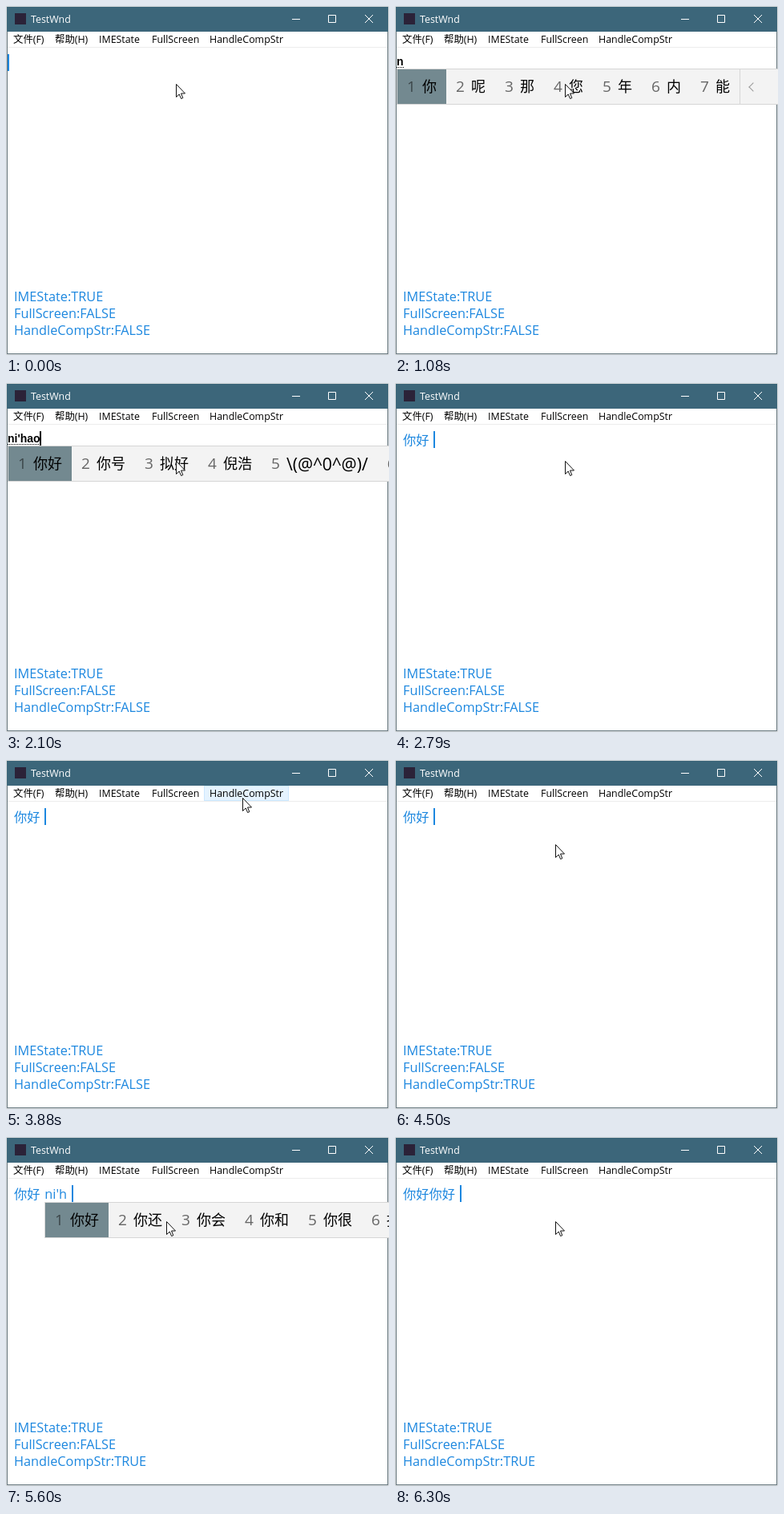
An HTML page for the animation above (8.63 s loop, 478x435 px).

```html
<!DOCTYPE html>
<html lang="zh-CN">
<head>
<meta charset="utf-8">
<title>TestWnd</title>
<style>
html, body { margin: 0; width: 100%; height: 100%; overflow: hidden; }
body {
  position: relative; background: #d9dcde; white-space: pre;
  font: 12.4px/20px 'Open Sans', 'Noto Sans CJK SC', 'Noto Sans CJK', sans-serif;
}
body *, body *::before { box-sizing: border-box; }
.abs, .menu span { position: absolute; }
[hidden], span:empty { display: none !important; }

.window { left: 1px; top: 1px; width: 476px; height: 433px; background: #fff; border: 1px solid #64757d; }
.bar { left: 1px; top: 1px; width: 476px; height: 31px; background: #3c667a; }
.name { left: 31px; top: 7px; color: #fff; }
.icon { left: 11px; top: 9px; width: 14px; height: 14px; background: #2b2238; }
svg { left: 0; top: 0; fill: none; }

.menu { left: 2px; top: 32px; width: 474px; height: 20px; border-bottom: 1px solid #ededed; }
.menu span { top: 0; height: 19px; line-height: 19px; padding: 0 7px; color: #000; }
.menu .hot { background: #e5f3ff; box-shadow: inset 0 0 0 1px #cce8ff; }
.menu .down { background: #cce8ff; box-shadow: inset 0 0 0 1px #99d1ff; }

.row, .status { font-size: 16.3px; line-height: 21px; color: #1c87df; }
.row { top: 60px; display: flex; gap: 5.7px; }
.row span { position: relative; top: 1px; }
.row i { width: 2px; height: 21px; background: #1c87df; }
.status { left: 10px; top: 352px; }

.sys { left: 2px; top: 61px; height: 16px; font: bold 14px/16px 'Liberation Sans', sans-serif; color: #000; border-bottom: 1px dotted #000; }
.syscaret { left: 42px; top: 60px; width: 2px; height: 18px; background: #000; }

.ime { display: flex; width: 700px; height: 45px; background: #f3f3f3; border: 1px solid #d6d6d6; line-height: 43px; font-size: 18px; color: #000; }
.cell { display: flex; flex: none; padding: 0 12px; }
.cell b { width: 19px; font-weight: 400; font-size: 19px; color: #666; }
.cell:first-child { background: #738990; }
.cell:first-child b { color: #3c4649; }
.latin { font-size: 21.3px; }
.back { position: relative; width: 60px; border-left: 1px solid #d6d6d6; }
.back::before {
  content: ''; position: absolute; left: 12px; top: 18px; width: 8px; height: 8px;
  border: solid #999; border-width: 0 0 1px 1px; transform: rotate(45deg);
}
</style>
</head>
<body>
<div class="abs window"></div>
<div class="abs bar"></div>
<div class="abs icon"></div>
<div class="abs name">TestWnd</div>
<svg class="abs" width="478" height="32" stroke="#fff">
  <path d="M357 16.5h10M402.5 11.5h9v9h-9zM448 11l10 10M458 11l-10 10"/>
</svg>
<div class="abs menu">
  <span style="left:0">文件(F)</span>
  <span style="left:52px">帮助(H)</span>
  <span style="left:107px">IMEState</span>
  <span style="left:173px">FullScreen</span>
  <span id="toggle" style="left:245px">HandleCompStr</span>
</div>
<div class="abs row" id="row"><span id="done"></span><span id="comp"></span><i></i></div>
<div class="abs status" id="status">IMEState:TRUE
FullScreen:FALSE
HandleCompStr:<span id="flag">FALSE</span></div>
<div class="abs sys" id="sys"></div>
<div class="abs syscaret" id="syscaret"></div>
<div class="abs ime" id="ime"></div>
<svg class="abs" id="mouse" width="14" height="21">
  <path d="M.5 .5V16.5L4.2 13 6.6 18.5 8.8 17.6 6.5 12H11.5Z" fill="#fff" stroke="#111"/>
</svg>
<script>
const LOOP = 8630;
const el = id => document.getElementById(id);

const CANDIDATES = {
  "n": '你 呢 那 您 年 内 能',
  "ni": '你 尼 呢 泥 拟 逆 妮',
  "ni'h": '你好 你还 你会 你和 你很 拟合 你后',
  "ni'ha": '你好 你哈 你还 你号 拟好 你海 倪浩',
  "ni'hao": '你好 你号 拟好 倪浩 \\(@^0^@)/ 你耗 泥耗',
};

// time, committed text, pinyin being typed
const TYPING = [
  [0, '', ''], [1080, '', "n"], [1310, '', "ni"], [1470, '', "ni'h"],
  [1630, '', "ni'ha"], [1860, '', "ni'hao"], [2790, '你好', ''],
  [5130, '你好', "n"], [5360, '你好', "ni"], [5600, '你好', "ni'h"],
  [5680, '你好', "ni'ha"], [5920, '你好', "ni'hao"], [6300, '你好你好', ''],
];

// time, x, y
const MOUSE = [
  [0, 212, 97], [3490, 214, 95], [3570, 228, 87], [3650, 254, 72],
  [3720, 279, 57], [3800, 292, 49], [3880, 295, 47], [4110, 293, 49],
  [4190, 283, 55], [4270, 262, 66], [4350, 235, 80], [4420, 207, 99], [4500, 200, 105],
];

const at = (track, t) => track.findLast(step => step[0] <= t);
const within = (t, from, to) => t >= from && t < to;

function fillIme(pinyin) {
  const cells = CANDIDATES[pinyin].split(' ').map((word, i) =>
    `<div class="cell"><b>${i + 1}</b><span class="${word[0] === '\\' ? 'latin' : ''}">${word}</span></div>`);
  el('ime').innerHTML = cells.join('') + '<div class="back"></div>';
}

let shown;
function showTyping(step) {
  if (step === shown) return;
  shown = step;
  const [, done, pinyin] = step;
  const inline = done !== '';
  el('done').textContent = done;
  el('comp').textContent = inline ? pinyin : '';
  el('row').style.left = inline ? '10px' : '2px';
  el('sys').textContent = pinyin;
  el('sys').hidden = inline || !pinyin;
  el('ime').hidden = !pinyin;
  if (!pinyin) return;
  fillIme(pinyin);
  el('ime').style.left = inline ? '48px' : '2px';
  el('ime').style.top = inline ? '81px' : '78px';
}

function draw(now) {
  const t = now % LOOP;
  showTyping(at(TYPING, t));

  const erased = within(t, 5360, 5440);
  el('row').hidden = erased || within(t, 1080, 2790);
  el('status').hidden = erased;
  el('syscaret').hidden = !within(t, 2100, 2640);
  el('flag').textContent = t < 4030 ? 'FALSE' : 'TRUE';

  const [, x, y] = at(MOUSE, t);
  el('mouse').style.transform = `translate(${x}px, ${y}px)`;
  el('toggle').classList.toggle('hot', x >= 247 && x < 353 && y < 52);
  el('toggle').classList.toggle('down', within(t, 3950, 4030));
  requestAnimationFrame(draw);
}
draw(performance.now());
</script>
</body>
</html>
```
